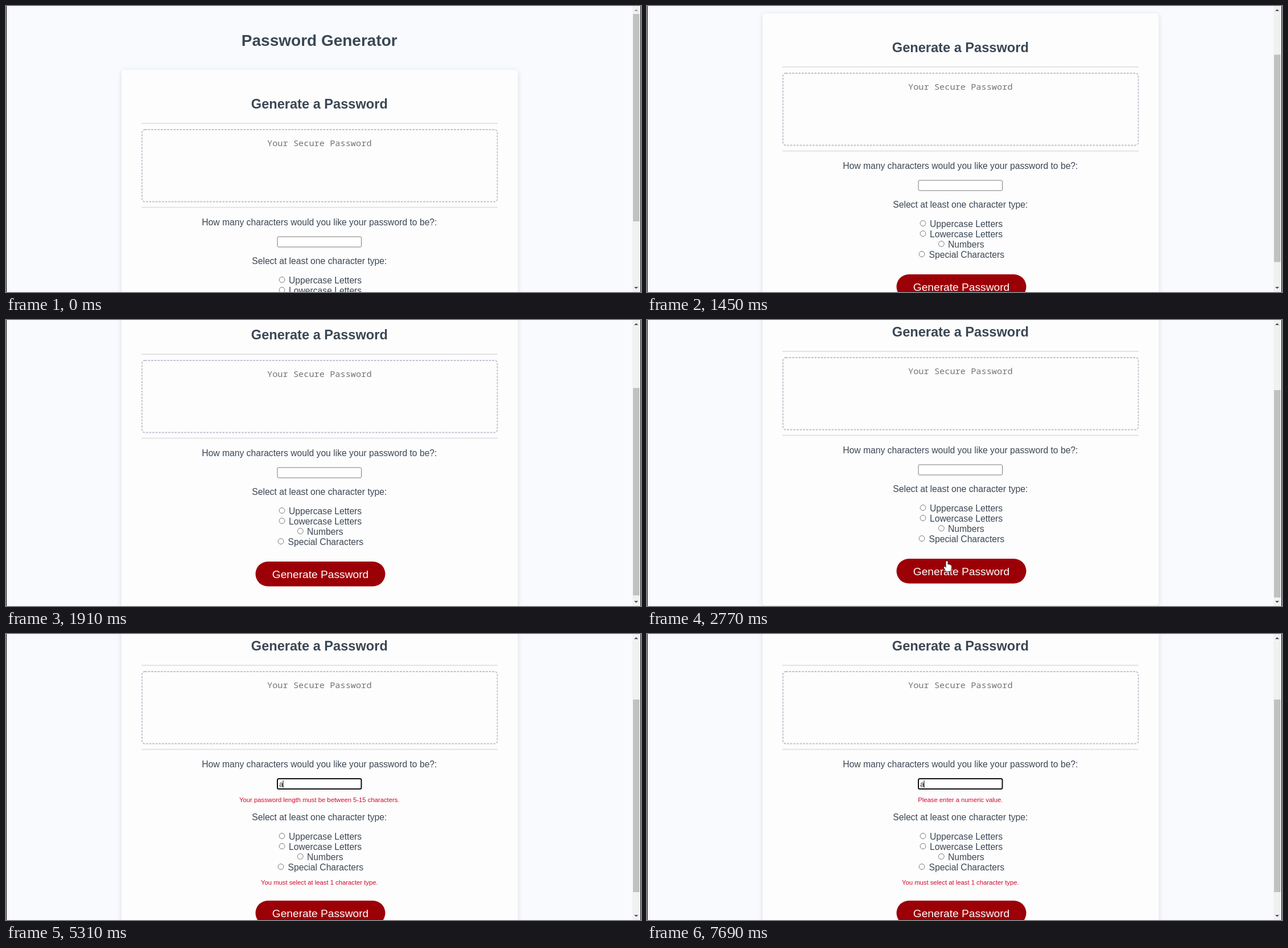
An HTML page with a canvas for the animation above (7.99 s loop, 1116 by 502 pixels).

```html
<!DOCTYPE html>
<html lang="en">
<head>
<meta charset="utf-8">
<title>Password Generator</title>
<style>
  html, body { margin: 0; width: 100%; height: 100%; overflow: hidden; background: #f8fafd; }
  canvas { display: block; }
</style>
</head>
<body>
<canvas id="stage" width="1116" height="502"></canvas>
<script>
const W = 1116, H = 502, LOOP = 7990;
const ctx = document.getElementById('stage').getContext('2d');
const SANS = '"Liberation Sans", Arial, sans-serif';
const MONO = '"Noto Sans Mono", monospace';
const INK = '#3b4754', ERROR = '#d4082a', CENTER = 550.8;

// Event times in ms
const ERRORS_AT = 2980, FOCUS_AT = 4220, CARET_ON = 4290, CARET_OFF = 4790,
      TYPED_AT = 4980, NUMERIC_AT = 7020;

const scrollKeys = [[920, 0], [1060, 19], [1250, 64], [1450, 99], [1680, 122],
                    [1720, 124], [1910, 146], [1980, 151]];
const pointerRuns = [
  { from: 2310, to: 5020, keys: [[2310, 600, 503], [2770, 527, 423], [2900, 527, 429],
                                 [3600, 527, 429], [4030, 586, 263]] },
  { from: 5312, to: 7670, keys: [[5312, 586, 263], [5740, 566, 420], [5970, 566, 420],
                                 [6370, 556, 482], [7150, 556, 482], [7670, 550, 504]] }
];

// Interpolates every value after the time in a list of keys.
function sample(keys, t) {
  if (t <= keys[0][0]) return keys[0].slice(1);
  for (let i = 1; i < keys.length; i++) {
    const a = keys[i - 1], b = keys[i];
    if (t <= b[0]) {
      const p = (t - a[0]) / (b[0] - a[0]);
      return a.slice(1).map((v, j) => v + (b[j + 1] - v) * p);
    }
  }
  return keys[keys.length - 1].slice(1);
}

function text(str, x, y, size, { color = INK, align = 'center', weight = '', family = SANS } = {}) {
  ctx.font = `${weight} ${size}px ${family}`;
  ctx.fillStyle = color;
  ctx.textAlign = align;
  ctx.fillText(str, x, y);
}

function box(x, y, w, h, r, fill, stroke, line = 1) {
  ctx.beginPath();
  ctx.roundRect(x, y, w, h, r);
  if (fill) { ctx.fillStyle = fill; ctx.fill(); }
  if (stroke) { ctx.strokeStyle = stroke; ctx.lineWidth = line; ctx.stroke(); }
}

function polygon(points, fill, stroke) {
  ctx.beginPath();
  points.forEach(([x, y]) => ctx.lineTo(x, y));
  ctx.closePath();
  ctx.lineJoin = 'round';
  if (stroke) { ctx.strokeStyle = stroke; ctx.lineWidth = 1.4; ctx.stroke(); }
  ctx.fillStyle = fill;
  ctx.fill();
}

function rule(y) {
  ctx.fillStyle = '#e3e3e8';
  ctx.fillRect(238, y, 626, 2);
}

function radio(x, labelX, y, label) {
  ctx.beginPath();
  ctx.arc(x, y - 0.5, 4.9, 0, Math.PI * 2);
  ctx.fillStyle = '#fff';
  ctx.fill();
  ctx.strokeStyle = '#767676';
  ctx.lineWidth = 1;
  ctx.stroke();
  text(label, labelX, y + 5.5, 15.7, { align: 'left' });
}

function drawCard(bottom) {
  ctx.save();
  ctx.shadowColor = 'rgba(40, 45, 80, 0.15)';
  ctx.shadowBlur = 8;
  ctx.shadowOffsetY = 2;
  box(203, 112, 696.5, bottom - 112, 5, '#fdfdfd');
  ctx.restore();
}

function drawInput(t) {
  const focused = t >= FOCUS_AT, typed = t >= TYPED_AT;
  if (focused) box(477, 405, 147.5, 18, 2.5, '#fff', '#101010', 2);
  else box(477, 405, 147.5, 18, 2, '#fff', '#7b7b7b', 1);
  if (typed) text('a', 480, 418.5, 13, { color: '#222', align: 'left' });
  if (typed || (t >= CARET_ON && t < CARET_OFF)) {
    ctx.fillStyle = '#000';
    ctx.fillRect(typed ? 486.5 : 480, 408, 1, 13);
  }
}

function drawPage(t, scroll) {
  const failed = t >= ERRORS_AT;
  const shift = failed ? 25 : 0, buttonShift = failed ? 49 : 0;
  ctx.save();
  ctx.translate(0, -scroll);
  drawCard(652 + buttonShift);
  text('Password Generator', CENTER, 70, 28, { weight: 'bold' });
  text('Generate a Password', CENTER, 179.5, 23.6, { weight: 'bold' });
  rule(205);
  ctx.setLineDash([3.6, 2]);
  box(239, 217, 624.5, 126.5, 5, null, '#bfbfd0', 1.8);
  ctx.setLineDash([]);
  text('Your Secure Password', CENTER, 245.5, 15.3, { color: '#757575', family: MONO });
  rule(352.5);
  text('How many characters would you like your password to be?:', CENTER, 384.5, 15.7);
  drawInput(t);
  if (failed) {
    const message = t < NUMERIC_AT ? 'Your password length must be between 5-15 characters.'
                                   : 'Please enter a numeric value.';
    text(message, CENTER, 445.5, 11.28, { color: ERROR });
    text('You must select at least 1 character type.', CENTER, 591, 11.28, { color: ERROR });
  }
  text('Select at least one character type:', CENTER, 453 + shift, 15.7);
  radio(485, 497, 481 + shift, 'Uppercase Letters');
  radio(485, 497, 499 + shift, 'Lowercase Letters');
  radio(517.3, 529, 517 + shift, 'Numbers');
  radio(483, 495.5, 535 + shift, 'Special Characters');
  box(438.5, 570 + buttonShift, 228, 43.5, 21.75, '#9c0007');
  text('Generate Password', 552.5, 598.5 + buttonShift, 19.2, { color: '#fff' });
  ctx.restore();
}

function drawScrollbar(t, scroll) {
  ctx.fillStyle = '#f1f1f1';
  ctx.fillRect(1101, 0, 13.5, H);
  ctx.fillStyle = '#c1c1c1';
  if (t < ERRORS_AT) ctx.fillRect(1102, 14 + scroll * 0.722, 11.5, 364);
  else ctx.fillRect(1102, 115, 11.5, 338);
  polygon([[1104, 9], [1107.5, 5.5], [1111, 9]], scroll > 0 ? '#505050' : '#a3a3a3');
  polygon([[1104, 493], [1107.5, 496.5], [1111, 493]], '#505050');
  ctx.fillStyle = '#000';
  ctx.fillRect(0, 0, 1, H);
  ctx.fillRect(1115, 0, 1, H);
}

function drawHand() {
  polygon([[-1.5, 1], [0, 0], [1.5, 1], [1.5, 6], [4, 6], [6, 7], [8, 8], [8, 13],
           [6.5, 18], [-1.5, 18], [-5, 12], [-5, 10], [-3.5, 10], [-1.5, 12]], '#fff', '#222');
}

function drawArrow() {
  polygon([[0, 0], [0, 15], [3.5, 11.8], [6, 17.5], [8.3, 16.5], [5.8, 11], [10.5, 11]], '#fff', '#111');
}

function drawBeam() {
  ctx.fillStyle = '#111';
  ctx.fillRect(0, -8, 1, 16);
  ctx.fillRect(-3, -8, 7, 1);
  ctx.fillRect(-3, 7, 7, 1);
}

function drawPointer(t) {
  const run = pointerRuns.find(r => t >= r.from && t < r.to);
  if (!run) return;
  const [x, y] = sample(run.keys, t);
  const buttonTop = t < ERRORS_AT ? 419 : 468;
  const overButton = x > 438 && x < 666 && y > buttonTop && y < buttonTop + 44;
  const overInput = x > 476 && x < 625 && y > 253 && y < 273;
  ctx.save();
  ctx.translate(Math.round(x), Math.round(y));
  if (overButton) drawHand();
  else if (overInput) drawBeam();
  else drawArrow();
  ctx.restore();
}

function draw(t) {
  const scroll = Math.round(sample(scrollKeys, t)[0]);
  ctx.fillStyle = '#f8fafd';
  ctx.fillRect(0, 0, W, H);
  drawPage(t, scroll);
  drawScrollbar(t, scroll);
  drawPointer(t);
}

const start = performance.now();
function tick() {
  draw((performance.now() - start) % LOOP);
  requestAnimationFrame(tick);
}
tick();
</script>
</body>
</html>
```
